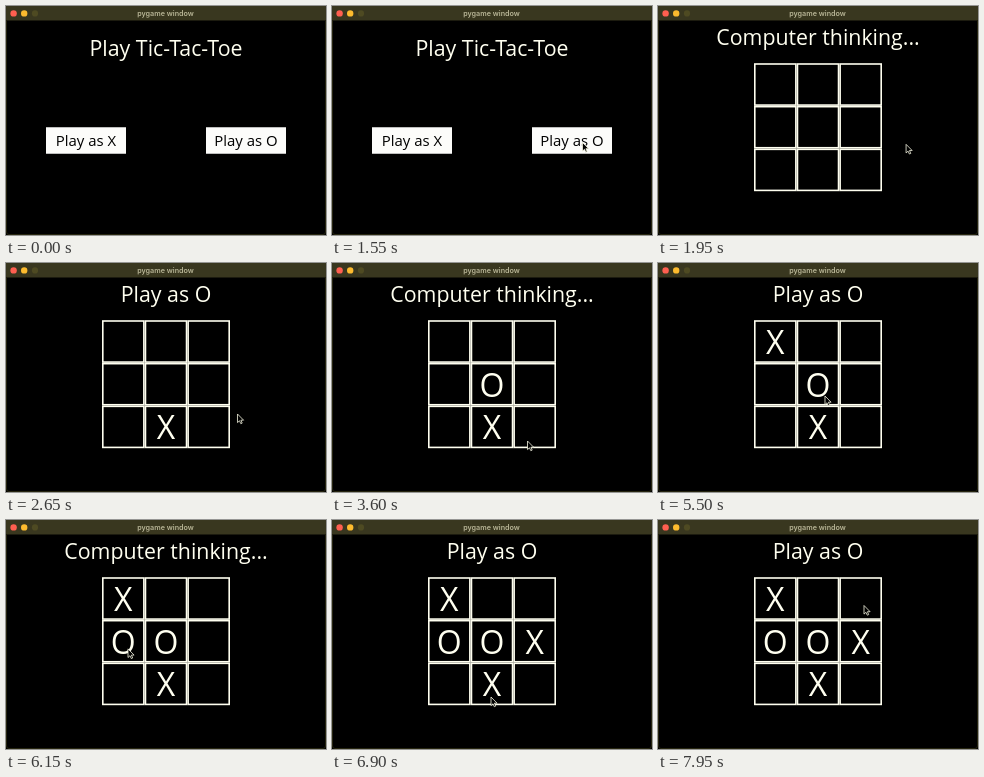
These frames come from a looping animation (320 px wide and 229 px high, 8 s). An HTML page:

```html
<!DOCTYPE html>
<html lang="en">
<head>
<meta charset="utf-8">
<style>
  html, body { margin: 0; height: 100%; overflow: hidden; background: #000; }
  svg { display: block; width: 320px; height: 229px; }
  text { font-family: "Open Sans", sans-serif; text-anchor: middle; fill: #fffff0; }
  .large { font-size: 21.333px; }
  .medium { font-size: 14.933px; fill: #000; }
  .move { font-size: 32px; }
  .bar { font: 600 7.2px Inter, sans-serif; fill: #b8b596; }
</style>
</head>
<body>
<svg viewBox="0 0 320 229">
  <rect width="320" height="229"/>
  <rect width="320" height="14.5" fill="#39371f"/>
  <circle cx="7.6" cy="7.4" r="3.2" fill="#ff5f50"/>
  <circle cx="18.2" cy="7.4" r="3.2" fill="#fdbb2e"/>
  <circle cx="29" cy="7.4" r="3.1" fill="#4e4a22"/>
  <text class="bar" x="159.5" y="9.8">pygame window</text>
  <path d="M.5 14.5V226q0 2.5 2.5 2.5h314q2.5 0 2.5-2.5V14.5" fill="none" stroke="#26250f"/>

  <g id="menu">
    <text class="large" x="160" y="49.5">Play Tic-Tac-Toe</text>
    <path d="M40 121.2h80v26.67h-80zM200 121.2h80v26.67h-80z" fill="#fcfcfa"/>
    <text class="medium" x="80" y="140.3">Play as X</text>
    <text class="medium" x="240" y="140.3">Play as O</text>
  </g>

  <g id="game">
    <text class="large" id="status" x="160" y="38.8"></text>
    <g id="board"></g>
  </g>

  <path id="pointer" d="M0 0V8.6L2 6.8L3.3 9.7L4.7 9.1L3.4 6.2H6.1Z"
        fill="#000" stroke="#f4f4e0" stroke-width=".8" stroke-linejoin="round"/>
</svg>
<script>
const LOOP = 8000, TILE = 128 / 3, LEFT = 96, TOP = 57.2, LINE = 1.6;
const $ = id => document.getElementById(id);

// Time, mark, column, row
const moves = [
  [2550, 'X', 1, 2],
  [3300, 'O', 1, 1],
  [4400, 'X', 0, 0],
  [5950, 'O', 0, 1],
  [6600, 'X', 2, 1]
];
const GAME_START = 1850;

// Time, x, y of the pointer tip
const path = [
  [650, 276, 232], [1400, 250.5, 136.5], [1750, 250.5, 136.5],
  [2650, 231.5, 151], [3200, 163, 125], [3320, 163, 125],
  [3600, 195.5, 178], [4050, 204, 184], [4400, 204, 184],
  [5050, 170, 135], [5400, 170, 135], [5500, 167, 133],
  [5850, 119, 125], [6000, 119, 125], [6900, 159, 177],
  [7950, 206, 85.5], [8000, 206, 85]
];

function add(parent, name, attrs, content = '') {
  const el = document.createElementNS('http://www.w3.org/2000/svg', name);
  for (const key in attrs) el.setAttribute(key, attrs[key]);
  el.textContent = content;
  return parent.appendChild(el);
}

for (let i = 0; i < 9; i++) {
  add($('board'), 'rect', {
    x: LEFT + i % 3 * TILE + LINE / 2,
    y: TOP + Math.floor(i / 3) * TILE + LINE / 2,
    width: TILE - LINE, height: TILE - LINE,
    fill: 'none', stroke: '#fffff0', 'stroke-width': LINE
  });
}
const marks = moves.map(([, mark, col, row]) => add($('board'), 'text', {
  class: 'move',
  x: LEFT + (col + .5) * TILE,
  y: TOP + (row + .5) * TILE + 12.4
}, mark));

const show = (el, on) => el.setAttribute('visibility', on ? 'visible' : 'hidden');

function pointerAt(t) {
  const next = Math.max(1, path.findIndex(p => p[0] > t));
  const [t0, x0, y0] = path[next - 1], [t1, x1, y1] = path[next];
  const u = Math.min(1, Math.max(0, (t - t0) / (t1 - t0)));
  const e = u * u * (3 - 2 * u);
  return [x0 + (x1 - x0) * e, y0 + (y1 - y0) * e];
}

function draw() {
  const t = performance.now() % LOOP;
  const playing = t >= GAME_START;
  const count = moves.filter(m => t >= m[0]).length;
  show($('menu'), !playing);
  show($('game'), playing);
  marks.forEach((el, i) => show(el, i < count));
  $('status').textContent = count % 2 ? 'Play as O' : 'Computer thinking...';
  $('pointer').setAttribute('transform', `translate(${pointerAt(t)})`);
  requestAnimationFrame(draw);
}
draw();
</script>
</body>
</html>
```
